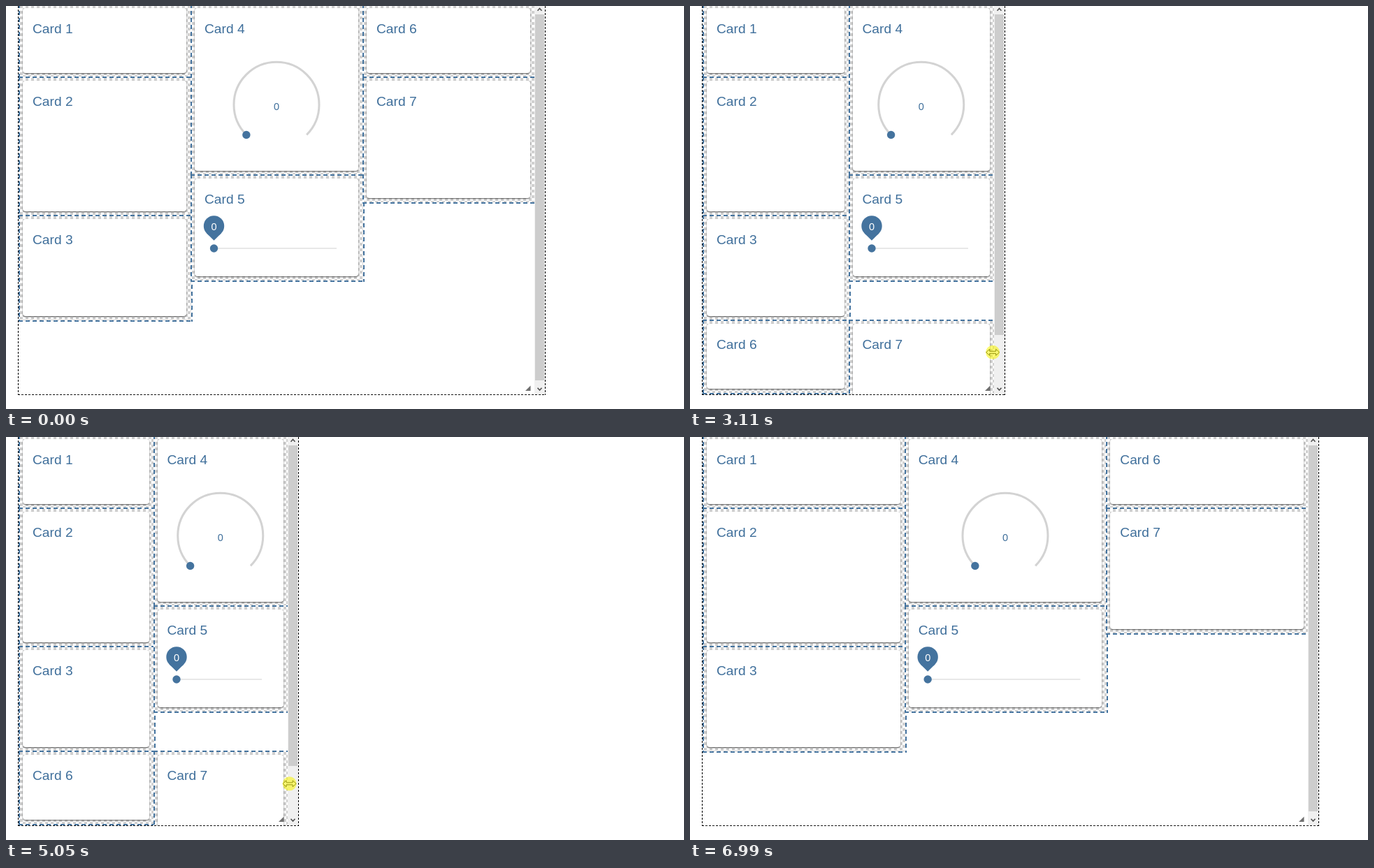
Animation, 970 px wide and 577 px high, one loop 7520 ms. Source, as an HTML page with a canvas:

```html
<!DOCTYPE html>
<html lang="en">
<head>
<meta charset="utf-8">
<title>Resizable card columns</title>
<style>
html, body { margin: 0; width: 100%; height: 100%; overflow: hidden; background: #fff; }
canvas { display: block; }
</style>
</head>
<body>
<canvas id="stage" width="970" height="577"></canvas>
<script>
const ctx = document.getElementById('stage').getContext('2d');
const LOOP = 7520, DRAG_START = 2080, TICK = 77.8;
const LEFT = 18, TOP = -3, BOTTOM = 556, MIN_COLUMN = 180;
const BLUE = '#44739e', INK = '#3f6f9b', GREY = '#d3d3d3';
const FONT = '"Liberation Sans", Arial, sans-serif';
const heights = [104, 198, 150, 244, 151, 104, 179];
const thumbEnd = [0, 260, 471, 536];

const POWER = 1.76;
const easeIn = f => f ** POWER;
const easeOut = f => 1 - (1 - f) ** POWER;

// Ticks from the start of the drag, and where panel edge and cursor are then
const path = [
  { at: -26, right: 772, x: 808, y: 553 },
  { at: -19, right: 772, x: 753, y: 498 },
  { at: -14, right: 772, x: 760, y: 498 },
  { at: -8, right: 772, x: 754.5, y: 499 },
  { at: -1, right: 772, x: 754.5, y: 499 },
  { at: 27, right: 316, x: 298.5, y: 494.5 },
  { at: 31, right: 316, x: 298.5, y: 494.5 },
  { at: 44, right: 622, x: 617, y: 500, ease: easeIn },
  { at: 58, right: 900, x: 899, y: 494 },
  { at: 60, right: 900, x: 899, y: 494 },
  { at: 62, right: 900, x: 914, y: 557 }
];

function poseAt(tick) {
  const i = path.findIndex(p => p.at >= tick);
  if (i < 1) return path.at(i);
  const a = path[i - 1], b = path[i];
  const f = (b.ease || easeOut)((tick - a.at) / (b.at - a.at));
  const mix = key => a[key] + (b[key] - a[key]) * f;
  return { right: mix('right'), x: mix('x'), y: mix('y') };
}

const tile = document.createElement('canvas');
tile.width = tile.height = 8;
const tileCtx = tile.getContext('2d');
tileCtx.fillStyle = '#d0d0d0';
tileCtx.fillRect(0, 0, 4, 4);
tileCtx.fillRect(4, 4, 4, 4);
const checker = ctx.createPattern(tile, 'repeat');

function line(x1, y1, x2, y2, width, color, dash = []) {
  ctx.beginPath();
  ctx.moveTo(x1, y1);
  ctx.lineTo(x2, y2);
  ctx.lineWidth = width;
  ctx.strokeStyle = color;
  ctx.setLineDash(dash);
  ctx.stroke();
  ctx.setLineDash([]);
}

function poly(points, fill, stroke) {
  ctx.beginPath();
  points.forEach(([x, y]) => ctx.lineTo(x, y));
  ctx.closePath();
  ctx.fillStyle = fill;
  ctx.fill();
  if (stroke) {
    ctx.lineWidth = 1;
    ctx.strokeStyle = stroke;
    ctx.stroke();
  }
}

function disc(x, y, r, color) {
  ctx.beginPath();
  ctx.arc(x, y, r, 0, 7);
  ctx.fillStyle = color;
  ctx.fill();
}

function text(s, x, y, size, color = INK, align = 'left') {
  ctx.font = `${size}px ${FONT}`;
  ctx.textAlign = align;
  ctx.fillStyle = color;
  ctx.fillText(s, x, y);
}

function gauge(x, y) {
  const r = 61, d = r * Math.SQRT1_2;
  ctx.beginPath();
  ctx.arc(x, y, r, Math.PI * 0.75, Math.PI * 2.25);
  ctx.lineWidth = 3;
  ctx.strokeStyle = GREY;
  ctx.stroke();
  disc(x - d, y + d, 5.7, BLUE);
  text('0', x, y + 8, 14.5, INK, 'center');
}

function slider(x, end, y) {
  line(x, y, end, y, 1.6, '#e0e0e0');
  disc(x, y, 5.7, BLUE);
  const top = y - 32, r = 14.7, d = r * Math.SQRT1_2;
  disc(x, top, r, BLUE);
  poly([[x - d, top + d], [x, top + r * Math.SQRT2], [x + d, top + d]], BLUE);
  text('0', x, top + 5.5, 14.5, '#fff', 'center');
}

function frame(x, y, w, h) {
  ctx.fillStyle = '#fff';
  ctx.fillRect(x, y, w + 3, h + 3);
  ctx.save();
  ctx.translate(x + 2, y + 2);
  ctx.fillStyle = checker;
  ctx.fillRect(0, 0, w - 1, h - 1);
  ctx.restore();

  for (const v of [y + 1, y + h + 2]) line(x, v, x + w + 3, v, 2, BLUE, [6, 4]);
  for (const v of [x + 1, x + w + 2]) line(v, y, v, y + h + 3, 2, BLUE, [6, 4]);

  ctx.save();
  ctx.shadowColor = 'rgba(0,0,0,.65)';
  ctx.shadowBlur = 2;
  ctx.shadowOffsetY = 1;
  ctx.beginPath();
  ctx.roundRect(x + 6, y + 6, w - 12, h - 11, 4);
  ctx.fillStyle = '#fff';
  ctx.fill();
  ctx.restore();
}

function card(n, x, y, right, h) {
  const snapped = Math.round(x);
  frame(snapped, y, Math.round(right) - snapped, h);
  text('Card ' + n, x + 20, y + 42, 19.2);
  if (n === 4) gauge((x + right) / 2, y + 144.3);
  if (n === 5) slider(x + 33.5, right - 37, y + 106);
}

function cards(edge, columns) {
  // Columns hold cards 1-3, 4-5 and 6-7; what does not fit wraps below
  const groups = columns === 3 ? [[1, 2, 3], [4, 5], [6, 7]]
    : columns === 2 ? [[1, 2, 3], [4, 5], [6], [7]]
    : [[1, 2, 3, 4, 5, 6, 7]];
  const width = (edge - LEFT) / columns;
  groups.forEach((group, g) => {
    const x = LEFT + (g % columns) * width;
    let y = g < columns ? TOP : 449;
    for (const n of group) {
      const h = heights[n - 1];
      card(n, x, y, x + width, h);
      y += h;
    }
  });
}

function chevron(x, y, dir) {
  ctx.beginPath();
  ctx.moveTo(x - 3, y + 1.7 * dir);
  ctx.lineTo(x, y - 1.5 * dir);
  ctx.lineTo(x + 3, y + 1.7 * dir);
  ctx.lineWidth = 1.6;
  ctx.strokeStyle = '#505050';
  ctx.stroke();
}

function panel(right, hover) {
  const edge = right - 16;
  const columns = Math.max(1, Math.min(3, Math.floor((edge - LEFT) / MIN_COLUMN)));
  ctx.save();
  ctx.beginPath();
  ctx.rect(LEFT, 0, edge - LEFT, BOTTOM);
  ctx.clip();
  cards(edge, columns);
  poly([[edge - 13, 551], [edge - 5.5, 551], [edge - 5.5, 543.5]], '#707070');
  ctx.restore();

  ctx.fillStyle = '#f0f0f0';
  ctx.fillRect(edge, 0, 15, BOTTOM);
  ctx.fillStyle = hover ? '#a6a6a6' : '#cdcdcd';
  ctx.fillRect(edge + 1, 12, 13, thumbEnd[columns] - 12);
  chevron(right - 8.5, 5, 1);
  chevron(right - 8.5, 548.5, -1);

  for (const v of [17.5, right - 0.5]) line(v, 0, v, 557, 1, '#000', [3, 2]);
  line(17, 556.5, right, 556.5, 1, '#000', [3, 2]);
}

function pointer(x, y) {
  const shape = [[0, 0], [0, 15], [3.5, 12], [6, 17.5], [8, 16.5], [5.7, 11.3], [10.5, 11]];
  poly(shape.map(([a, b]) => [x + a + 0.5, y + b + 0.5]), '#fff', '#000');
}

function resizer(x, y, pressed) {
  const quarter = [[9.5, 0], [4.5, 4.5], [4.5, 1.5]];
  const flip = (points, sx, sy) => points.map(([a, b]) => [a * sx, b * sy]);
  const right = [...flip(quarter, 1, -1).reverse(), ...quarter];
  const shape = [...right, ...flip(right, -1, -1)];
  poly(shape.map(([a, b]) => [x + a, y + b]), '#fff', '#222');
  if (pressed) disc(x, y, 10, 'rgba(250,245,0,.55)');
}

function draw(t) {
  const { right, x, y } = poseAt(Math.floor((t - DRAG_START) / TICK));
  const edge = Math.round(right);
  const resizing = t >= 1460 && t < 6770;
  const pointing = !resizing && t >= 70 && t < 6985;
  const hover = pointing && x >= edge - 15 && x < edge - 2 && y < 536;
  ctx.fillStyle = '#fff';
  ctx.fillRect(0, 0, 970, 577);
  // The panel keeps its first width until the drag begins
  panel(edge, hover);
  if (pointing) pointer(Math.round(x), Math.round(y));
  if (resizing) resizer(x, y, t >= 1920);
}

const start = performance.now();
function tick() {
  draw((performance.now() - start) % LOOP);
  requestAnimationFrame(tick);
}
tick();
</script>
</body>
</html>
```
